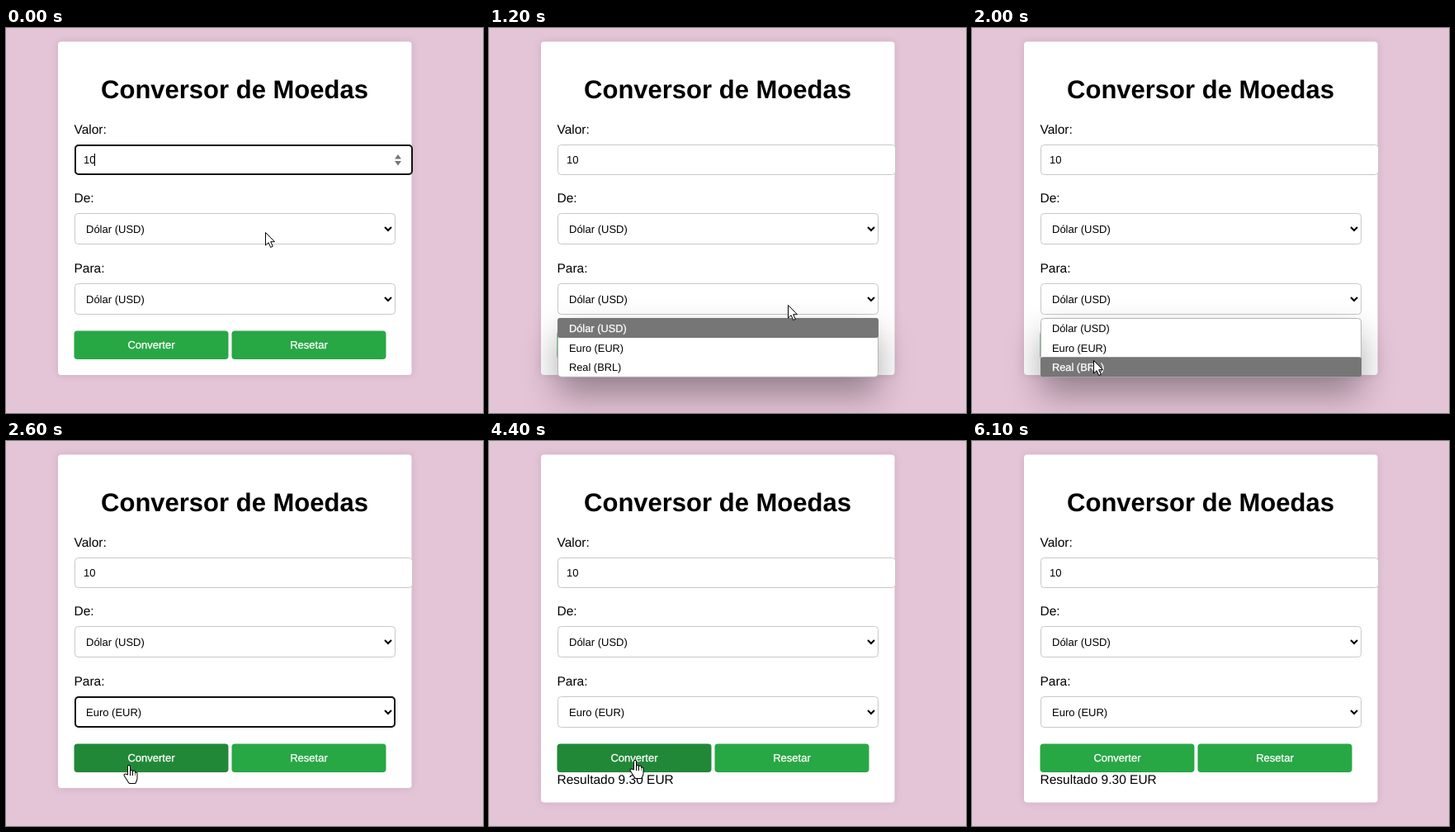
Animation, 578 px wide and 466 px high, one loop 6.8 s. Source, as an HTML page:

```html
<!DOCTYPE html>
<html lang="pt">
<head>
<meta charset="utf-8">
<title>Conversor de Moedas</title>
<style>
  html, body { margin: 0; width: 100%; height: 100%; overflow: hidden; background: #e4c4d7; }
  svg { display: block; font: 13px "Liberation Sans", Arial, sans-serif; text-rendering: geometricPrecision; }
  .label { font-size: 15.5px; }
  .title { font-size: 31px; font-weight: bold; }
  .field { fill: #fff; stroke: #c8c8c8; }
  .ring { fill: none; stroke: #101014; stroke-width: 2; }
  .chevron { fill: none; stroke: #000; stroke-width: 2; }
  .button { fill: #28a745; }
  .button.hover { fill: #218838; }
  .caption, .option.on { fill: #fff; stroke: #fff; stroke-width: .3; }
  .caption, .title { text-anchor: middle; }
  .option { font-size: 12.8px; }
  #card { fill: #fff; filter: drop-shadow(0 0 5px rgba(0, 0, 0, .1)); }
  #panel { fill: #fff; stroke: #b4b4b4; filter: drop-shadow(0 21px 20px rgba(0, 0, 0, .34)); }
  #arrow { fill: #fff; stroke: #000; }
  #hand path { fill: #fff; stroke: #fff; stroke-width: 2; stroke-linecap: round; stroke-linejoin: round; }
  #hand .edge { stroke: #000; stroke-width: 4; }
</style>
</head>
<body>
<svg id="stage" width="578" height="466"></svg>
<script>
const LOOP = 6800, STEP = 100;
const OPEN = 1000, PICK = 2600, CLICK = 3300, RESULT = 4000, EXIT = 5600;
const LEFT = 83, WIDTH = 389, MENU = 351, ROW = 23.6;
const currencies = ['Dólar (USD)', 'Euro (EUR)', 'Real (BRL)'];

// Pointer moves: start, end, destination
const moves = [
  [0, 700, 370, 302], [700, 1200, 362, 335], [1200, 2000, 147, 402], [2000, 2200, 144, 387],
  [2500, 2600, 149, 392], [2900, 3500, 174, 381], [4200, 4500, 178, 388],
  [4600, 5000, 291, 377], [5000, 5300, 345, 378], [5300, 5500, 425, 5]
];

const text = (cls, x, y, str, id = '') => `<text id="${id}" class="${cls}" x="${x}" y="${y}">${str}</text>`;
const rect = (cls, x, y, w, h, id = '') =>
  `<rect id="${id}" class="${cls}" x="${x}" y="${y}" width="${w}" height="${h}" rx="4"/>`;
const field = (id, y, w, h) =>
  rect('field', LEFT + .5, y + .5, w - 1, h - 1) + rect('ring', LEFT + 1, y + 1, w - 2, h - 2, id);
const select = (id, y) => field(id + 'Ring', y, WIDTH, 38) +
  text('', 97, y + 23.5, currencies[0], id) + `<path class="chevron" d="M459 ${y + 17}l4 4 4-4"/>`;
const button = (id, x, caption) =>
  rect('button', x, 366.5, 187, 34.5, id) + text('caption', x + 93.5, 388, caption);

const handShape = 'M0 2v12M3 8v6M6 8.500v5M8.500 10.500v4M0 14h8.500v3l-1.500 4h-6l-5.500-8.500z';
const $ = id => document.getElementById(id);

$('stage').innerHTML =
  rect('', 63, 16.5, 428.5, 403.5, 'card') +
  text('title', 277, 84.5, 'Conversor de Moedas') +
  text('label', 82.5, 128, 'Valor:') +
  text('label', 82.5, 211, 'De:') +
  text('label', 82.5, 295.5, 'Para:') +
  text('label', 82.5, 414.5, 'Resultado 9.30 EUR', 'result') +
  field('amountRing', 141, 410, 37) + text('', 94, 164, '10') +
  `<g id="typing"><path id="caret" d="M107 152h1v15h-1z"/>
    <path fill="#777" d="M471 158.500l4-5.500 4 5.500zM471 161l4 5.500 4-5.500z"/></g>` +
  select('from', 224) + select('to', 309) +
  button('convert', 82.5, 'Converter') + button('reset', 273.5, 'Resetar') +
  `<g id="menu">
    ${rect('', LEFT + .5, MENU + .5, WIDTH - 1, ROW * 3, 'panel')}
    <rect id="mark" x="${LEFT}" width="${WIDTH}" height="${ROW + .5}" rx="3" fill="#767676"/>
    ${currencies.map((name, i) => text('option', 97, MENU + 17 + i * ROW, name)).join('')}
  </g>
  <path id="arrow" d="M.5.5V16l3.600-3.300 2.600 5.800 2.600-1.200-2.600-5.600H11.500z"/>
  <g id="hand"><path class="edge" d="${handShape}"/><path d="${handShape}"/></g>`;

const options = document.querySelectorAll('.option');
const show = (id, on) => $(id).style.display = on ? '' : 'none';
const clamp = (v, max) => Math.max(0, Math.min(max, v));
const ease = k => k * k * (3 - 2 * k);

function pointerAt(t) {
  let x = 314, y = 247;
  for (const [start, end, toX, toY] of moves) {
    const k = ease(clamp((t - start) / (end - start), 1));
    x += (toX - x) * k;
    y += (toY - y) * k;
  }
  return [Math.round(x), Math.round(y)];
}

function draw(t) {
  const [x, y] = pointerAt(t);
  const typing = t < OPEN, open = !typing && t < PICK, done = t >= RESULT;
  const over = left => !open && y > 366 && y < 401 && x > left && x < left + 187;
  const onConvert = over(82.5), onReset = over(273.5), hand = onConvert || onReset;

  show('amountRing', typing);
  show('typing', typing);
  show('caret', t % 1000 < 500);
  show('fromRing', false);
  show('toRing', t >= PICK && t < CLICK);
  $('to').textContent = currencies[t < PICK ? 0 : 1];
  $('convert').classList.toggle('hover', onConvert);
  $('reset').classList.toggle('hover', onReset);

  show('menu', open);
  const row = clamp(Math.floor((y - MENU) / ROW), 2);
  $('mark').setAttribute('y', MENU + row * ROW);
  options.forEach((option, i) => option.classList.toggle('on', i === row));

  show('result', done);
  $('card').setAttribute('height', done ? 421 : 403.5);

  show('arrow', !hand && t < EXIT);
  show('hand', hand);
  $(hand ? 'hand' : 'arrow').setAttribute('transform', `translate(${x} ${y})`);
}

const start = performance.now();
function tick() {
  const t = (performance.now() - start) % LOOP;
  draw(Math.floor(t / STEP) * STEP);
  requestAnimationFrame(tick);
}
tick();
</script>
</body>
</html>
```
